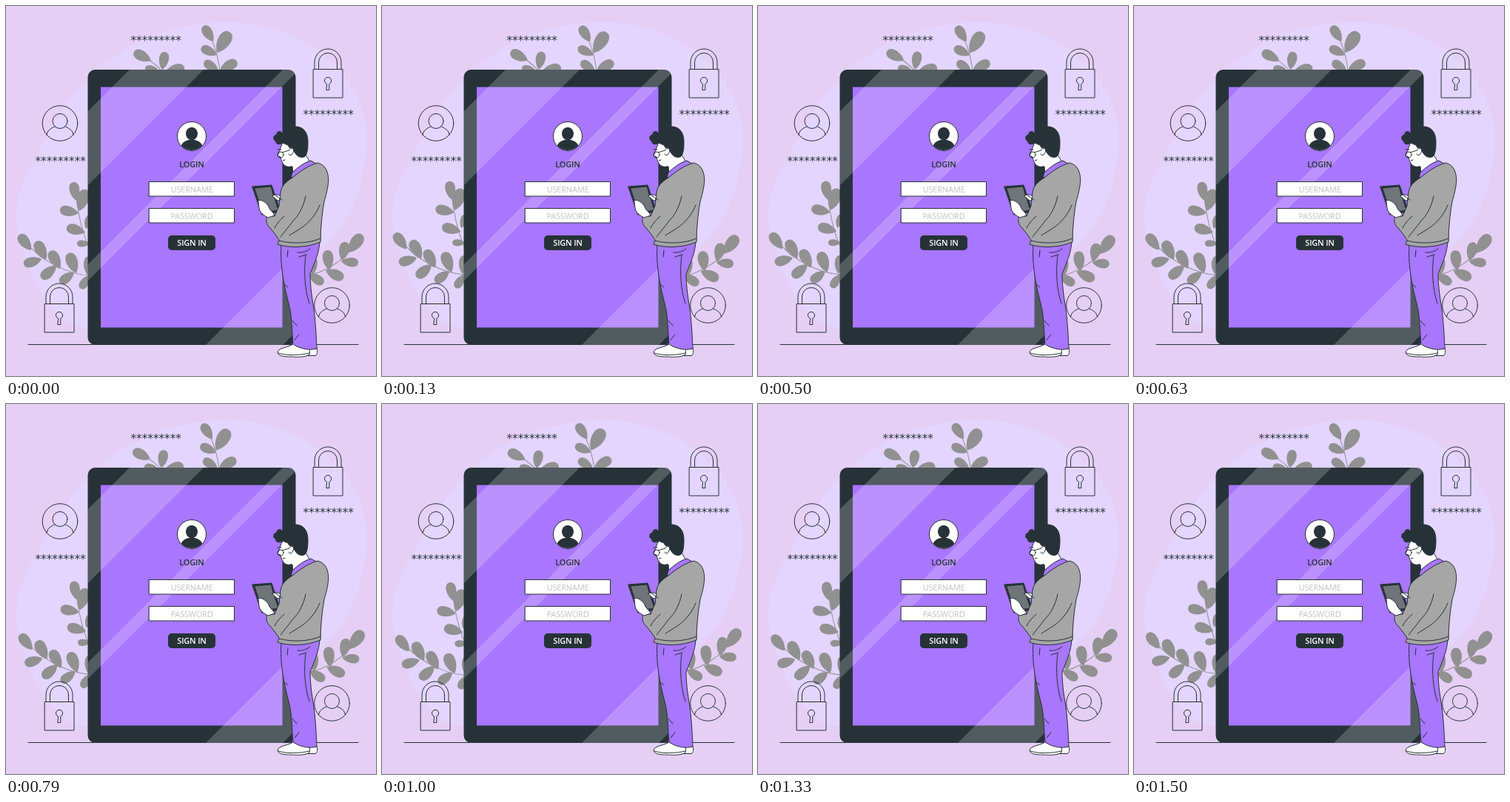
An HTML page for the animation above (1540 ms loop, 500 px wide and 500 px high).

```html
<!DOCTYPE html>
<html lang="en">
<head>
<meta charset="utf-8">
<title>Login</title>
<style>
  html, body { margin: 0; width: 100%; height: 100%; overflow: hidden; background: #e6cff5; }
  svg { display: block; width: 100%; height: 100%; }
  .line { fill: none; stroke: #263238; stroke-width: 1; stroke-linecap: round; stroke-linejoin: round; }
  .white { fill: #fff; }
  .purple { fill: #a876ff; }
  .gray { fill: #a6a6a6; }
  .dark { fill: #263238; }
  .label { font: 11px "Open Sans", "Noto Sans", sans-serif; font-stretch: 75%; letter-spacing: -.2px; text-anchor: middle; }
  .bold { font-weight: 600; }
  .stars { font: 15.2px "DejaVu Sans", sans-serif; fill: #263238; }
</style>
</head>
<body>
<svg viewBox="0 0 500 500">
  <defs>
    <clipPath id="deviceClip"><rect x="110.500" y="86" width="281" height="372" rx="10"/></clipPath>
    <clipPath id="avatarClip"><circle cx="251" cy="176" r="19"/></clipPath>
    <g id="lock" class="line">
      <path d="M415.500 85.500h39.500v38.500h-39.500zM417 85.500V76a18 18 0 0 1 36 0v9.500M422.500 85.500V76a12.500 12.500 0 0 1 25 0v9.500"/>
      <path d="M433.200 105.200a4.600 4.600 0 1 1 3.600 0V113.500h-3.600z"/>
    </g>
    <g id="user" class="line">
      <circle r="23.800"/>
      <circle cy="-3" r="10"/>
      <path d="M-18 15.500C-17 9 -12 6.500 -7 4.500M7 4.500C12 6.500 17 9 18 15.500"/>
    </g>
  </defs>

  <path fill="#e3d5ff" d="M300 22C400 22 487 90 487 180C487 240 462 300 430 325C390 360 300 420 110 435C85 436 55 410 38 370C23 335 14 308 14 280C14 245 40 205 62 165C95 105 165 22 300 22Z"/>
  <g id="plants" fill="#919191"></g>

  <use href="#lock"/>
  <use href="#lock" x="-363" y="317"/>
  <use href="#user" x="73" y="158.500"/>
  <use href="#user" x="440.500" y="404.500"/>
  <text class="stars" x="168.500" y="52">*********</text>
  <text class="stars" x="401.500" y="152">*********</text>
  <text class="stars" x="39.500" y="215">*********</text>
  <path class="line" d="M30 457.500H476"/>

  <g clip-path="url(#deviceClip)">
    <path class="dark" d="M110 86h282v372h-282z"/>
    <path class="purple" d="M128 109.500h245.500v325H128z"/>
    <path fill="#fff" opacity=".2" d="M167 86H267L110 243V143zM374 86H396L110 372V350zM270 458H374L391 441V337z"/>
  </g>
  <circle class="line" style="fill:#fff" cx="251" cy="176" r="19.500"/>
  <g class="dark" clip-path="url(#avatarClip)">
    <ellipse cx="251" cy="172.500" rx="8" ry="8.700"/>
    <path d="M235 200C235 188 238 183 247 181H255C264 183 267 188 267 200Z"/>
  </g>
  <text class="label bold dark" x="251" y="218">LOGIN</text>
  <g class="line" style="fill:#fff">
    <path d="M193.500 237.500h115v19.500h-115zM193.500 273.500h115v19.500h-115z"/>
  </g>
  <g class="label" fill="#c4c4c4">
    <text x="251" y="251.500">USERNAME</text>
    <text x="251" y="287.500">PASSWORD</text>
  </g>
  <rect class="dark" x="219" y="310" width="64" height="20" rx="5"/>
  <text class="label bold white" x="251" y="324">SIGN IN</text>

  <g class="line">
    <path class="white" d="M409 463L420 462C421 467 421 471 418 472.500H405Z"/>
    <path class="white" d="M389 456C383 462 368 461 367 468C368 473 374 474 386 474C396 475 406 474 410 471C411 467 410 464 409 461Z"/>
    <path d="M368 469C380 473 397 472 410 469"/>
    <path class="purple" d="M372 321C370 350 375 375 382 402C387 420 386 440 388 457C397 463 409 466 420 463C419 440 418 420 414 397C412 383 411 372 411 362C417 347 423 334 424 319Z"/>
    <path d="M405 337C402 360 404 385 410 402M394 333C399 334 406 332 411 328M396 339L406 336M381 330L380 339M376 376L381 380M387 425L393 432M390 451L396 444"/>
    <path class="white" d="M376 182C371 188 371 194 367 202C368 204 370 203 371 204C372 210 375 216 380 217C383 218 386 216 387 217L388 229L411 211L403 198Z"/>
    <path class="dark" d="M375 185C370 188 364 187 365 183C360 181 361 174 366 174C365 169 372 168 373 172C378 167 385 163 393 163C403 164 408 172 408 184C408 194 407 201 403 204C396 206 391 201 389 195C387 189 384 194 382 190C382 187 378 188 375 185Z"/>
    <path class="white" d="M383 194C386 190 390 193 388 198C387 202 383 203 382 200"/>
    <path d="M373 198L383 195M374 209L377 208M367 194L372 194"/>
    <circle cx="371" cy="201" r="4"/>
    <path class="purple" d="M386 233C385 228 387 225 389 223C396 217 404 211 412 209L421 214C409 217 398 224 386 233Z"/>
    <path class="dark" d="M333 244L359 242L371 278L346 282Z"/>
    <path fill="#6f7579" d="M336 246L358 244L368 276L347 279Z"/>
    <path class="gray" d="M387 232C379 237 372 243 371 252L369 270L363 284L353 284C350 290 353 297 358 301C363 308 368 313 369 317L367 322C385 328 408 326 425 319C425 300 427 281 430 264C434 251 437 238 435 228C433 218 428 214 421 212C408 216 398 223 387 232Z"/>
    <path d="M405 257C402 270 397 281 390 288L371 312M424 269C419 281 411 292 399 300L383 310M376 284C372 288 366 293 363 300M369 317C386 322 410 321 425 314"/>
    <path class="white" d="M341 263C344 261 349 264 353 268C356 272 356 276 360 278L363 283L354 286C349 283 343 280 342 273Z"/>
    <path class="white" d="M360 256C364 254 368 255 371 257L369 263C366 263 363 260 360 256Z"/>
    <path d="M360 253L373 262"/>
  </g>
</svg>
<script>
  const LOOP = 1540, STEPS = 37;
  const plants = document.getElementById('plants');

  // Teardrop leaf growing from its base point to its tip.
  function leaf([x, y, tipX, tipY]) {
    const length = Math.hypot(tipX - x, tipY - y);
    const angle = Math.atan2(tipY - y, tipX - x) * 180 / Math.PI;
    const a = length * .35, w = length * .36;
    return `<path transform="translate(${x} ${y}) rotate(${angle})"
      d="M0 0C${a} ${-w} ${length} ${-w} ${length} 0C${length} ${w} ${a} ${w} 0 0Z"/>`;
  }

  function plant(stem, leaves) {
    plants.innerHTML += `<path d="${stem}" fill="none" stroke="#919191"/>` + leaves.map(leaf).join('');
  }

  plant('M290 100Q288 65 276 42', [
    [280, 48, 267, 27], [285, 63, 302, 35], [285, 66, 264, 56],
    [289, 87, 312, 75], [287, 88, 268, 75]]);
  plant('M217 97Q207 80 188 70', [
    [196, 74, 173, 62], [211, 86, 215, 62], [214, 91, 241, 83], [207, 88, 188, 84]]);
  plant('M115 332Q101 305 95 260', [
    [95, 263, 91, 238], [99, 277, 108, 248], [98, 280, 73, 275],
    [107, 306, 82, 299], [108, 301, 114, 283], [113, 321, 96, 321]]);
  plant('M113 364C85 363 50 345 32 325', [
    [34, 330, 18, 309], [54, 343, 41, 318], [48, 342, 24, 349], [68, 351, 48, 368],
    [73, 355, 60, 331], [92, 360, 73, 374], [95, 361, 85, 334],
    [112, 364, 101, 382], [110, 363, 113, 338]]);
  plant('M408 364C430 360 455 345 470 325', [
    [463, 333, 481, 309], [454, 344, 459, 319], [453, 345, 476, 347], [437, 357, 434, 330],
    [432, 357, 456, 368], [415, 363, 413, 337], [409, 362, 429, 375]]);

  function draw(now) {
    const time = Math.floor(now % LOOP / LOOP * STEPS) / STEPS * LOOP;
    const sway = .95 * (Math.sin((time + 60) / LOOP * 2 * Math.PI) - .24);
    plants.setAttribute('transform', `rotate(${sway} 250 200)`);
    requestAnimationFrame(draw);
  }
  draw(0);
</script>
</body>
</html>
```
